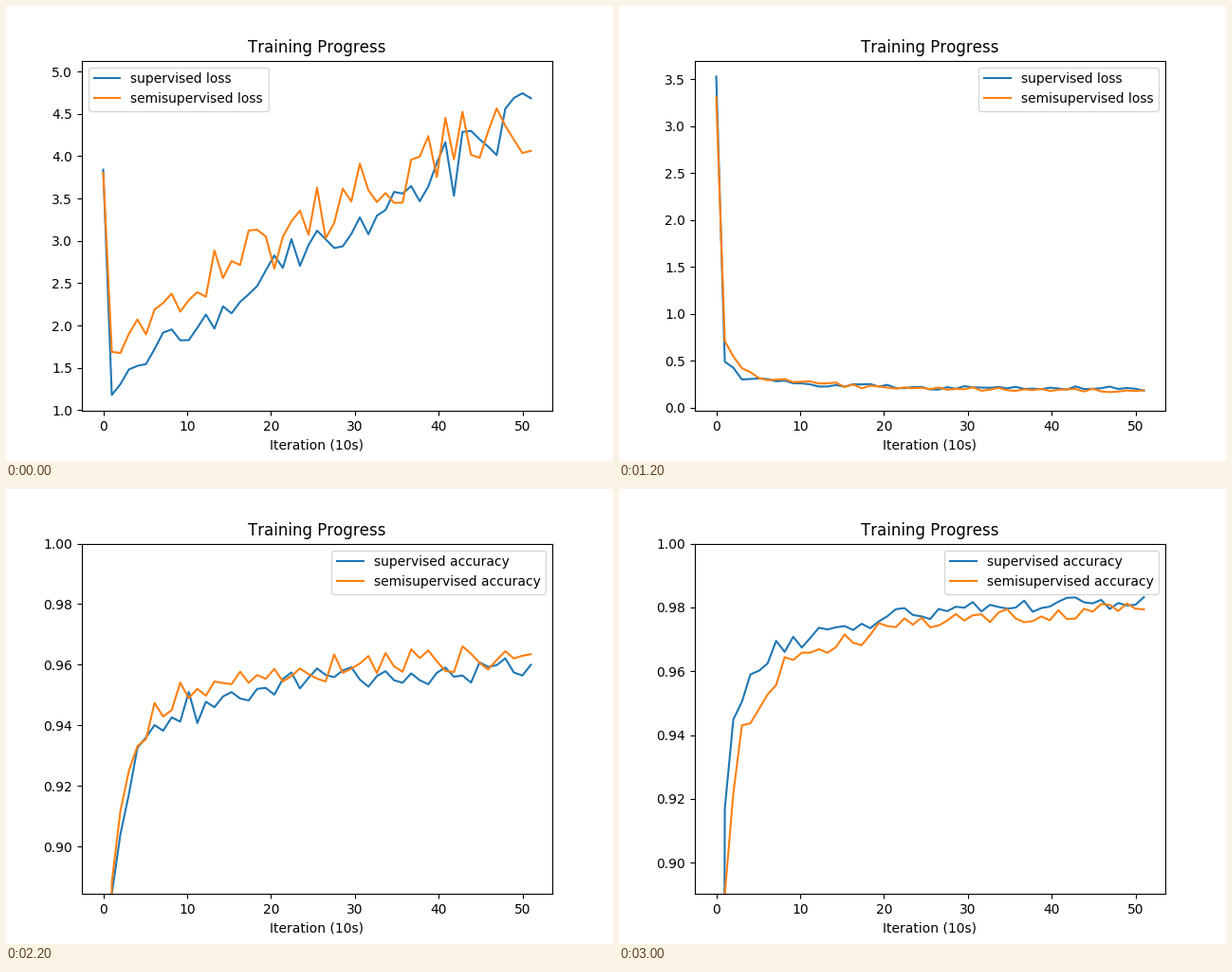
These frames come from a looping animation (640 px wide and 480 px high, 3200 ms). A matplotlib script:

```python
import numpy as np
import matplotlib.pyplot as plt
from matplotlib.animation import FuncAnimation

plt.rcParams["text.kerning_factor"] = 6

RUNS = 8
SAMPLES = 51
STEPS = np.arange(1, SAMPLES)
X = np.linspace(0, 51, SAMPLES)

# Key runs: (start, second, final) value of each curve, then the axis range.
LOSS = {
    0: (3.84, 1.18, 4.30, 3.80, 1.69, 4.45, .992, 5.128),
    2: (3.81, .70, 1.50, 4.72, .87, 1.50, .447, 4.924),
    6: (3.53, .49, .20, 3.31, .71, .18, -.035, 3.70),
}
# Key runs: (start, second, final) error rate of each curve.
ERROR = {
    0: (.9, .180, .115, .9, .200, .110),
    1: (.9, .156, .102, .9, .1722, .088),
    3: (.9, .1157, .042, .9, .112, .037),
    5: (.9, .1291, .021, .9, .105, .024),
    7: (.9, .083, .018, .9, .1098, .020),
}


def between(keys, run):
    return [np.interp(run, list(keys), column) for column in zip(*keys.values())]


def progress(falling):
    """0 to 1 from the second sample to the last: steep decay or steady climb."""
    if falling:
        decay = STEPS ** -.6
        return (1 - decay) / (1 - decay[-1])
    return ((STEPS - 1) / (SAMPLES - 2)) ** .8


def curve(start, second, final, rng):
    trend = second + (final - second) * progress(final < second)
    noise = np.clip(rng.normal(0, .065, SAMPLES - 1), -.11, .11)
    noise[0] = 0
    return np.append(start, trend * np.exp(noise))


def make_scene(n):
    """Return the measured quantity, both curves and the y range."""
    rng = np.random.default_rng(n)
    accuracy, run = divmod(n, RUNS)
    keys = between(ERROR if accuracy else LOSS, run)
    curves = [curve(*keys[k:k + 3], rng) for k in (0, 3)]
    if accuracy:
        curves = [1 - c for c in curves]
        return "accuracy", curves, (min(c[1] for c in curves), 1)
    return "loss", curves, keys[6:]


scenes = [make_scene(n) for n in range(2 * RUNS)]
fig, ax = plt.subplots(figsize=(6.4, 4.8), dpi=100)


def draw(n):
    kind, curves, limits = scenes[n]
    ax.clear()
    for name, y in zip(("supervised", "semisupervised"), curves):
        ax.plot(X, y, label=f"{name} {kind}")
    ax.set_ylim(*limits)
    ax.set_title("Training Progress")
    ax.set_xlabel("Iteration (10s)")
    ax.legend(loc="upper left" if n == 0 else "upper right")
    return ax.get_children()


anim = FuncAnimation(fig, draw, frames=2 * RUNS, interval=200, repeat=True)
plt.show()
```
